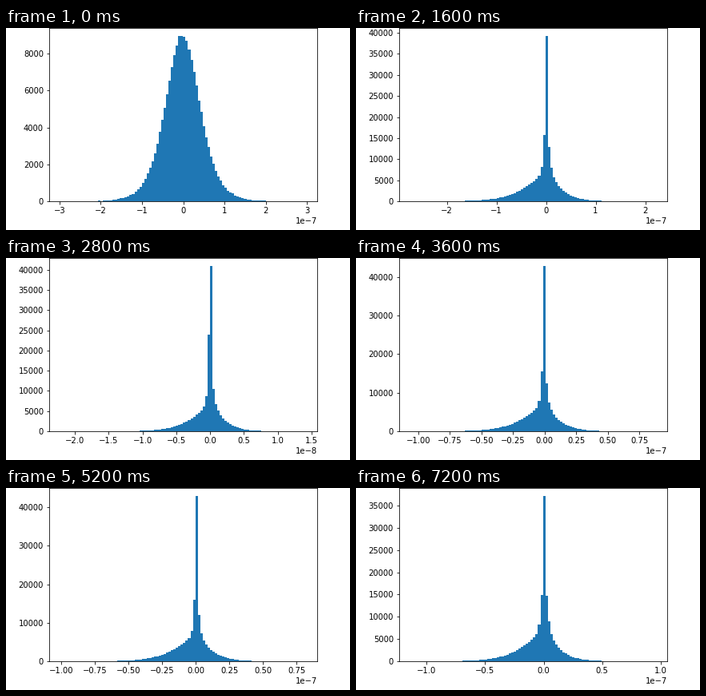
Animation of 430x253 px, one loop 7600 ms. Source, as a matplotlib script:

```python
import matplotlib.pyplot as plt
import numpy as np
from matplotlib.animation import FuncAnimation

WIDTH, HEIGHT, DPI = 430, 253, 72
BINS = 100
MARGIN = 0.05


def bin_edges(lo, hi):
    """Histogram edges that leave the default margin inside the x limits."""
    pad = (hi - lo) * MARGIN / (1 + 2 * MARGIN)
    return np.linspace(lo + pad, hi - pad, BINS + 1)


def bell(exponent, lo, hi, peak, spread=9.2, seed=0):
    """Logistic-shaped histogram with a little sampling noise."""
    edges = bin_edges(lo, hi)
    offset = np.arange(BINS) + 0.5 - (0 - edges[0]) / (edges[1] - edges[0]) + 0.3
    counts = peak / np.cosh(offset / spread) ** 2
    noise = np.random.default_rng(seed).normal(size=BINS)
    counts = np.maximum(counts + 0.6 * noise * np.sqrt(counts), 0)
    return exponent, lo, hi, counts * peak / counts.max()


def tail(k, scale, power):
    return 6900 * np.exp(-(k / scale) ** power)


def spike(exponent, lo, hi, peak, near=(7900, 15500, 12500, 7500), width=1.0):
    """Sharp peak at zero; near holds the two bins on either side of it."""
    edges = bin_edges(lo, hi)
    center = int(-edges[0] / (edges[1] - edges[0]))
    left2, left1, right1, right2 = near

    def side(length, first, second, scale, power, decay):
        k = np.arange(1, length + 1)
        heights = tail(k, scale * width, power)
        heights += (second - heights[1]) * decay ** (k - 2.0)
        heights[:2] = first, second
        return heights

    left = side(center, left1, left2, 10.85, 1.3, 0.2)
    right = side(BINS - 1 - center, right1, right2, 6.8, 1.2, 0.4)
    return exponent, lo, hi, np.concatenate([left[::-1], [peak], right])


HISTOGRAMS = [
    bell(-7, -3.25, 3.24, 8970, seed=4),
    bell(-7, -3.07, 3.06, 9300, seed=1),
    bell(-3, -1.35, 1.32, 8800, seed=2),
    spike(-4, -1.62, 1.505, 37000),
    spike(-7, -2.96, 2.44, 39260, (8100, 15800, 12800, 8000)),
    spike(-7, -2.88, 2.375, 37500),
    spike(-8, -6.2, 5.0, 39450),
    spike(-8, -2.38, 1.58, 41000, (8700, 24000, 10500, 6800), 0.9),
    spike(-8, -2.15, 1.65, 38000),
    spike(-7, -1.15, 0.97, 42900),
    spike(-7, -1.10, 0.92, 39290),
    spike(-7, -1.0886, 0.901, 47065, (7200, 15200, 10800, 6500)),
    spike(-8, -4.95, 4.06, 38000),
    spike(-7, -1.0886, 0.901, 42920, (7800, 15900, 12100, 7300)),
    spike(-7, -1.13, 0.95, 38000),
    spike(-8, -6.002, 5.385, 32525, (6600, 9400, 25200, 10500), 1.03),
    spike(-8, -2.3, 1.555, 39290),
    spike(-8, -5.6, 4.9, 42900),
    spike(-7, -1.232, 1.053, 37170, (8300, 14900, 14700, 9000)),
]

fig = plt.figure(figsize=(WIDTH / DPI, HEIGHT / DPI), dpi=DPI, facecolor="white")
# The top edge of the axes sits just past the top of the stage.
ax = fig.add_axes([54 / WIDTH, 36 / HEIGHT, 334.8 / WIDTH, 217.44 / HEIGHT])


def draw(frame):
    exponent, lo, hi, counts = HISTOGRAMS[frame]
    unit = 10.0 ** exponent
    edges = bin_edges(lo, hi) * unit
    ax.clear()
    ax.bar(edges[:-1], counts, width=np.diff(edges), align="edge", color="C0")
    ax.set_xlim(lo * unit, hi * unit)
    ax.set_ylim(0, counts.max() * (1 + MARGIN))


anim = FuncAnimation(fig, draw, frames=len(HISTOGRAMS), interval=400, repeat=True)
plt.show()
```
